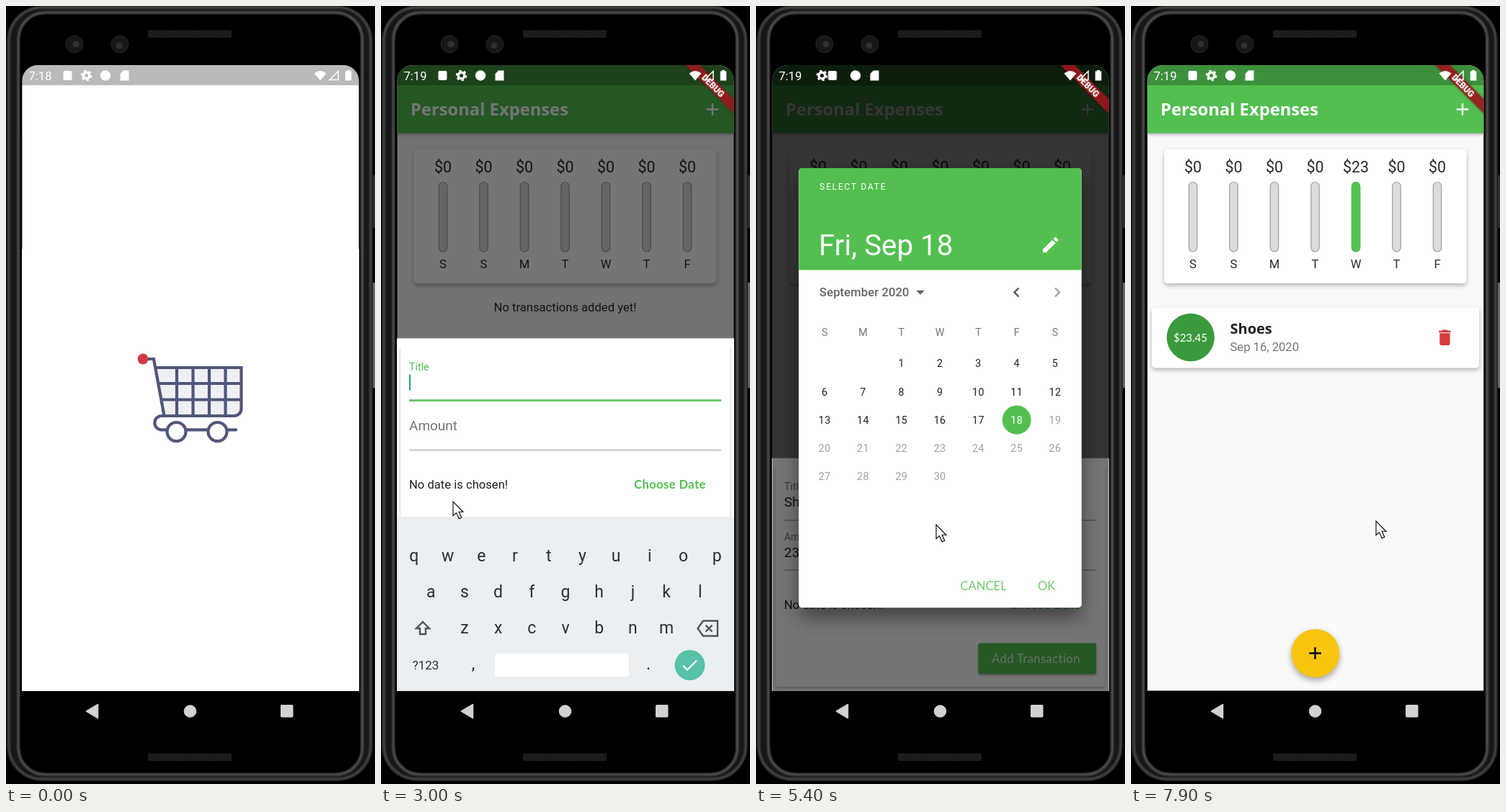
Write an HTML page that moves like this. It is 512x1080 px and loops after 8000 ms.

```html
<!DOCTYPE html>
<html lang="en">
<head>
<meta charset="utf-8">
<title>Personal Expenses</title>
<style>
html, body { margin: 0; width: 100%; height: 100%; overflow: hidden; background: #000; }
svg { display: block; width: 100vw; height: 100vh; font: 16.63px Roboto, sans-serif; }
.mid { text-anchor: middle; }
.geo { font-family: Lato, sans-serif; letter-spacing: .4px; }
.head { font-family: "Open Sans", sans-serif; font-weight: 700; }
.green { fill: #52bf50; }
.card { fill: #fff; filter: drop-shadow(0 3px 3px rgba(0,0,0,.28)); }
.line { stroke: #8c8c8c; stroke-width: 1.2; }
.focus { stroke: #52bf50; stroke-width: 2.4; }
.icon { fill: none; stroke: #4d565c; stroke-width: 2.4; }
.label { font-size: 14.25px; }
.entry { font-size: 19px; fill: #212121; }
.entry tspan { fill-opacity: 0; animation: typed 8s step-end infinite; }

.sheet { animation: sheet 8s infinite; }
.scrim { animation: scrim 8s infinite; }
.picker { animation: picker 8s infinite; }
.keyboard { animation: keyboard 8s infinite; }
.caret { animation: caret 8s step-end infinite; }
.cursor { animation: cursor 8s infinite ease-in-out; }
.title-label { animation: title-label 8s infinite; }
.amount-label { animation: amount-label 8s infinite; }
.title-focus { animation: title-focus 8s step-end infinite; }
.amount-focus { animation: amount-focus 8s step-end infinite; }
.notes { animation: notes 8s step-end infinite; }
.fresh { animation: fresh 8s step-end infinite; }
.slide-r { animation: slide-r 8s infinite; }
.slide-l { animation: slide-l 8s infinite; }

@keyframes typed { 0% { fill-opacity: 1 } 60%, 100% { fill-opacity: 0 } }
@keyframes sheet {
  0%, 24.4% { transform: translateY(324px); animation-timing-function: ease-out }
  28%, 35% { transform: none; animation-timing-function: ease-out }
  37.5%, 57.5% { transform: translateY(-166.5px); animation-timing-function: ease-in-out }
  60%, 89.5% { transform: none; animation-timing-function: ease-in }
  92%, 100% { transform: translateY(324px) }
}
@keyframes scrim { 0%, 24.4% { opacity: 0 } 28%, 89.5% { opacity: .54 } 92%, 100% { opacity: 0 } }
@keyframes picker { 0%, 64% { opacity: 0 } 66.5%, 85.2% { opacity: 1 } 87%, 100% { opacity: 0 } }
@keyframes keyboard {
  0%, 35% { transform: translateY(242px); animation-timing-function: ease-out }
  37.5%, 57.5% { transform: none; animation-timing-function: ease-in }
  60%, 100% { transform: translateY(242px) }
}
@keyframes caret {
  0% { opacity: 0; transform: none }
  36% { opacity: 1; transform: none }
  38.75% { opacity: 1; transform: translate(11.3px, 0) }
  40% { opacity: 1; transform: translate(21.8px, 0) }
  41.25% { opacity: 1; transform: translate(32.6px, 0) }
  42.5% { opacity: 1; transform: translate(42.7px, 0) }
  43.75% { opacity: 1; transform: translate(52.5px, 0) }
  45.625% { opacity: 1; transform: translate(0, 70px) }
  48.125% { opacity: 1; transform: translate(10.7px, 70px) }
  50% { opacity: 1; transform: translate(21.3px, 70px) }
  51.25% { opacity: 1; transform: translate(26.3px, 70px) }
  52.5% { opacity: 1; transform: translate(37px, 70px) }
  53.75% { opacity: 1; transform: translate(47.7px, 70px) }
  57.5%, 100% { opacity: 0; transform: none }
}
@keyframes cursor {
  0%, 12.45% { opacity: 0; transform: translate(330px, 720px) }
  12.5% { opacity: 1; transform: translate(330px, 720px) }
  17%, 24% { opacity: 1; transform: translate(233px, 907px) }
  30.5%, 57.5% { transform: translate(100px, 688px) }
  62%, 64% { transform: translate(400px, 826px) }
  67.4%, 68% { transform: translate(250px, 720px) }
  71%, 75% { transform: translate(253px, 577px) }
  80%, 82.5% { transform: translate(403px, 803px) }
  84.8%, 90% { transform: translate(384px, 899.5px) }
  96%, 100% { opacity: 1; transform: translate(340px, 715px) }
}
@keyframes title-label {
  0%, 35% { transform: translate(39px, 686px) scale(1.333); fill: #757575 }
  36.5%, 45.6% { transform: translate(39px, 672px); fill: #52bf50 }
  50%, 100% { transform: translate(39px, 672px); fill: #757575 }
}
@keyframes amount-label {
  0%, 45.6% { transform: translate(39px, 755px) scale(1.333); fill: #757575 }
  47.1%, 57.5% { transform: translate(39px, 741.5px); fill: #52bf50 }
  60%, 100% { transform: translate(39px, 741.5px); fill: #757575 }
}
@keyframes title-focus { 0% { opacity: 0 } 35% { opacity: 1 } 45.625%, 100% { opacity: 0 } }
@keyframes amount-focus { 0% { opacity: 0 } 45.625% { opacity: 1 } 57.5%, 100% { opacity: 0 } }
@keyframes notes { 0% { opacity: 1 } 12.5% { opacity: 0 } 25%, 100% { opacity: 1 } }
@keyframes fresh { 0% { opacity: 0 } 12.5% { opacity: 1 } 25%, 100% { opacity: 0 } }
@keyframes slide-r { 0%, 66.25% { transform: none } 67.3%, 68% { transform: translateX(20.5px) } 69%, 100% { transform: none } }
@keyframes slide-l { 0%, 66.25% { transform: none } 67.3%, 68% { transform: translateX(-20px) } 69%, 100% { transform: none } }
</style>
</head>
<body>
<svg viewBox="0 0 512 1080" preserveAspectRatio="none">
  <defs>
    <clipPath id="screen"><rect x="22.5" y="82" width="467" height="924" rx="22"/></clipPath>
    <clipPath id="view"><rect x="22.5" y="82" width="467" height="868.5"/></clipPath>
    <pattern id="mesh" width="3" height="3" patternUnits="userSpaceOnUse">
      <rect width="3" height="3" fill="#101010"/><path d="M0 3L3 0" stroke="#333"/>
    </pattern>
    <filter id="soft"><feGaussianBlur stdDeviation=".8"/></filter>
    <path id="zed" d="M0 0H56V9L18 72H56V82H0V73L38 10H0Z" fill="#404040"/>
    <path id="plus" d="M-8.3 0H8.3M0-8.3V8.3" stroke-width="2.4"/>
    <path id="pencil" d="M3 17.25V21h3.75L17.81 9.94l-3.75-3.75zM20.71 7.04c.39-.39.39-1.02 0-1.41l-2.34-2.34c-.39-.39-1.02-.39-1.41 0l-1.83 1.83 3.75 3.75z"/>
  </defs>

  <!-- phone body -->
  <rect width="512" height="1080"/>
  <path d="M510.500 235V308" stroke="#2c2c2c" stroke-width="3"/>
  <path d="M510.500 384V530" stroke="#666" stroke-width="3"/>
  <rect x="1" y="0" width="507.5" height="1076" rx="48" fill="#161616"/>
  <g fill="none" filter="url(#soft)">
    <rect x="4" y="2" width="502" height="1071" rx="46" stroke="#4a4a4a" stroke-width="3"/>
    <rect x="17" y="9" width="477.500" height="1058" rx="37" fill="#050505" stroke="#555" stroke-width="3"/>
  </g>
  <g fill="#171717" stroke="#252525"><circle cx="95" cy="53" r="12"/><circle cx="158" cy="53" r="12"/></g>
  <g fill="#2f2f2f"><circle cx="97" cy="53" r="4.5"/><circle cx="157" cy="55" r="4.5"/></g>
  <circle cx="337" cy="53" r="8.5"/>
  <rect x="197" y="33.5" width="116" height="10.5" rx="2" fill="url(#mesh)"/>
  <rect x="197" y="1037.5" width="116" height="10.5" rx="2" fill="url(#mesh)"/>

  <g clip-path="url(#screen)">
    <rect x="22" y="82" width="468" height="924"/>
    <g clip-path="url(#view)">
      <!-- home -->
      <rect x="22" y="82" width="468" height="869" fill="#fafafa"/>
      <rect x="22" y="82" width="468" height="94.5" class="green" style="filter:drop-shadow(0 2px 2px rgba(0,0,0,.3))"/>
      <rect x="22" y="82" width="468" height="28" fill-opacity=".25"/>
      <text x="41" y="152" class="head" font-size="23.76" fill="#fff">Personal Expenses</text>
      <use href="#plus" x="460" y="143.5" stroke="#fff"/>
      <rect x="46" y="199" width="419.5" height="186" rx="4.75" class="card"/>
      <g id="chart" class="mid" fill="#2a2a2a"></g>
      <g class="pre-list">
        <text x="255.5" y="424" class="mid" fill="#2a2a2a">No transactions added yet!</text>
        <use href="#zed" transform="translate(188 470) rotate(-8)"/>
        <use href="#zed" transform="translate(274 583) rotate(14.5)"/>
        <use href="#zed" transform="translate(183 708.5) rotate(-14.5)"/>
      </g>
      <g class="post-list">
        <rect x="29" y="418.5" width="454" height="84" rx="4.75" class="card"/>
        <circle cx="82.7" cy="460" r="33.2" fill="#3b9a3d"/>
        <text x="82.5" y="466" class="mid" font-family="Lato, sans-serif" font-size="15" fill="#fff">$23.45</text>
        <text x="137.5" y="455" class="head" font-size="20" fill="#212121">Shoes</text>
        <text x="137.5" y="479" fill="#757575">Sep 16, 2020</text>
        <path transform="translate(421.2 446) scale(1.188)" fill="#d83a3d" d="M6 19c0 1.1.9 2 2 2h8c1.1 0 2-.9 2-2V7H6zM19 4h-3.5l-1-1h-5l-1 1H5v2h14z"/>
      </g>
      <circle cx="255.8" cy="898.5" r="33.5" fill="#f8c50e" style="filter:drop-shadow(0 4px 4px rgba(0,0,0,.35))"/>
      <use href="#plus" x="255.5" y="898.5" stroke="#000"/>
      <rect x="22" y="82" width="468" height="869" class="scrim"/>

      <!-- entry form -->
      <g class="sheet">
        <rect x="22" y="627.7" width="468" height="500" fill="#fff"/>
        <rect x="27" y="633" width="457.5" height="312.5" rx="4.75" fill="#fff" style="filter:drop-shadow(0 1px 1.5px rgba(0,0,0,.35))"/>
        <rect x="25" y="628.5" width="461" height="12" fill="#fff"/>
        <path class="line" d="M39 714H472M39 783H472"/>
        <path class="focus title-focus" d="M39 714H472"/>
        <path class="focus amount-focus" d="M39 783.5H472"/>
        <text class="label title-label">Title</text>
        <text class="label amount-label">Amount</text>
        <text id="title" class="entry" x="39" y="694.5"></text>
        <text id="amount" class="entry" x="39" y="764.5"></text>
        <rect class="caret" x="39" y="678" width="2.2" height="22" fill="#3ba08f"/>
        <text class="pre-date" x="39" y="836.5" fill="#212121">No date is chosen!</text>
        <text class="post-date" x="39" y="836.5" fill="#212121">Wed, 9/16/2020</text>
        <text class="geo green" x="351" y="836.5" font-weight="700">Choose Date</text>
        <rect x="308.5" y="884.5" width="163.5" height="42.5" rx="2.5" class="green" style="filter:drop-shadow(0 2px 1.5px rgba(0,0,0,.35))"/>
        <text class="geo" x="327" y="912" fill="#e2f5e1">Add Transaction</text>
      </g>

      <!-- date picker -->
      <g class="picker">
        <rect x="22" y="82" width="468" height="869" fill-opacity=".54"/>
        <rect x="59.3" y="225" width="392.5" height="610.3" rx="4.75" fill="#fff" style="filter:drop-shadow(0 14px 14px rgba(0,0,0,.45))"/>
        <path class="green" d="M59.300 366.500V229.700a4.700 4.700 0 0 1 4.700-4.700H447.100a4.700 4.700 0 0 1 4.700 4.700V366.500Z"/>
        <g fill="#fff">
          <text x="88.3" y="255" font-size="11.9" letter-spacing="1.82">SELECT DATE</text>
          <g font-size="40.3">
            <text class="pre-pick" x="87" y="346">Fri, Sep 18</text>
            <text class="post-pick" x="87.5" y="346">Wed, Sep 16</text>
          </g>
          <use href="#pencil" transform="translate(394.5 317.3) scale(1.188)"/>
        </g>
        <text x="88" y="403.3" font-weight="500" letter-spacing=".1" fill="#666">September 2020</text>
        <path d="M222 394.7h12l-6 6z" fill="#666"/>
        <path class="icon" stroke="#555" d="M364.5 391.5l-6 6 6 6"/>
        <path class="icon" style="stroke:#a3a3a3" d="M415 391.5l6 6-6 6"/>
        <g id="days" class="mid" font-size="14.25"></g>
        <g class="green" font-family="Lato, sans-serif" fill-opacity=".82">
          <text x="283.5" y="811">CANCEL</text><text x="391" y="811">OK</text>
        </g>
      </g>

      <g transform="translate(489.5 82) rotate(45)">
        <rect x="-62" y="33.3" width="124" height="14.3" fill="#a0181e" fill-opacity=".87" style="filter:drop-shadow(0 0 2px rgba(0,0,0,.35))"/>
        <text class="mid" y="44.8" font-size="12.1" font-weight="900" fill="#fff">DEBUG</text>
      </g>

      <!-- splash -->
      <g class="pre-splash">
        <rect x="22" y="82" width="468" height="869" fill="#fff"/>
        <rect x="22" y="82" width="468" height="28" fill="#bababa"/>
        <g fill="none" stroke="#50567a" stroke-width="4.2">
          <path fill="#eef0f4" d="M208 502H326.5V559a10 10 0 0 1-10 10H219.5"/>
          <path d="M190 490H205L219.5 569H216a9.7 9.7 0 0 0 0 19.4H319" stroke-linecap="round"/>
          <path d="M211 524H326M215 546.5H326M237 502V569M259.5 502V569M282 502V569M304.5 502V569"/>
          <g fill="#fff"><circle cx="236.5" cy="591" r="13"/><circle cx="293.5" cy="591" r="13"/></g>
        </g>
        <circle cx="190" cy="490" r="7.4" fill="#d23742"/>
      </g>

      <!-- keyboard -->
      <g class="keyboard mid" fill="#263037">
        <rect x="22" y="709" width="468" height="242" fill="#eceff2"/>
        <g id="letters" class="pre-keys" font-size="23"></g>
        <g id="digits" class="post-keys" font-size="36"></g>
        <circle cx="428.5" cy="915" r="21" fill="#57c1a9"/>
        <path class="icon" style="stroke:#fff" d="M419 915.5l6 6 13-13"/>
      </g>
    </g>

    <!-- status bar -->
    <g fill="#fff">
      <text class="pre-clock" x="31.5" y="102.5">7:18</text>
      <text class="post-clock" x="31.5" y="102.5">7:19</text>
      <rect class="slide-r" x="79.5" y="90" width="12" height="13" rx="2"/>
      <g class="slide-l" fill="none" stroke="#fff">
        <circle cx="111.5" cy="96.5" r="4.3" stroke-width="3.4"/>
        <circle cx="111.5" cy="96.5" r="6.6" stroke-width="2.4" stroke-dasharray="3.2 3.71"/>
      </g>
      <g class="notes">
        <circle cx="138" cy="96.5" r="7.2"/>
        <path d="M163 89.5h7.5v14h-12v-9.5z"/>
      </g>
      <g class="fresh">
        <circle cx="138" cy="96.5" r="6"/><circle cx="164.5" cy="96.5" r="7.2"/><circle cx="190.5" cy="97" r="2.3"/>
      </g>
      <path d="M427.5 93.5Q436 86.5 444.5 93.5L436 103.5Z"/>
      <path d="M461 90.5V102.5H449Z" fill="none" stroke="#fff" stroke-width="1.5"/>
      <path d="M473 89h4v1.5h2.3V103.5h-8.6V90.5H473z"/>
    </g>
    <g fill="#d2d2d2" stroke="#d2d2d2" stroke-linejoin="round">
      <path d="M111.5 979L127.5 969.5V988.5Z" stroke-width="1.5"/>
      <circle cx="255.5" cy="979" r="8.3"/>
      <rect x="381.5" y="970.5" width="16.5" height="16.5" rx="1"/>
    </g>
  </g>
  <path class="cursor" d="M0 0V19.5L4.5 15.6L8.2 23.8L11.8 22.2L8.2 14.3H14Z" fill="#fff" stroke="#000" stroke-width="1.1"/>
</svg>
<script>
const LOOP = 8000;
const fill = (id, html) => { document.getElementById(id).innerHTML = html; };
const text = (x, y, s, attrs = '') => `<text x="${x}" y="${y}" ${attrs}>${s}</text>`;

// Hard cuts: pre-* shows before the given time, post-* after it.
const cuts = { splash: 300, clock: 2000, keys: 3650, pick: 5800, date: 6600, list: 7150 };
const css = Object.entries(cuts).map(([name, ms]) => {
  const rule = (cls, a, b) => `.${cls}{animation:${cls} ${LOOP}ms step-end infinite}
    @keyframes ${cls}{0%{opacity:${a}}${ms / LOOP * 100}%,100%{opacity:${b}}}`;
  return rule('pre-' + name, 1, 0) + rule('post-' + name, 0, 1);
}).join('');
document.head.append(Object.assign(document.createElement('style'), { textContent: css }));

const typed = (word, times) => [...word]
  .map((c, i) => `<tspan style="animation-delay:${times[i]}ms">${c}</tspan>`).join('');
fill('title', typed('Shoes', [3100, 3200, 3300, 3400, 3500]));
fill('amount', typed('23.45', [3850, 4000, 4100, 4200, 4300]));

const sum = (x, s, cls = '') => text(x, 231, s, `font-size="21.4" class="${cls}"`);
fill('chart', [...'SSMTWTF'].map((day, i) => {
  const x = 86 + 56.5 * i, spent = i === 4;
  return (spent ? sum(x, '$0', 'pre-list') + sum(x, '$23', 'post-list') : sum(x, '$0')) +
    `<rect x="${x - 5.7}" y="244.5" width="11.4" height="96.5" rx="5.7" fill="#dcdcdc" stroke="#9e9e9e" stroke-width="1.2"/>` +
    (spent ? `<rect x="${x - 6.2}" y="244" width="12.4" height="97.5" rx="6" class="green post-list"/>` : '') +
    text(x, 364, day);
}).join(''));

const GREEN = '#52bf50', INK = '#212121';
const colX = i => 95.2 + 53.3 * (i % 7);
const day = (d, ink, disc = '', cls = '') => {
  const x = colX(d + 1), y = 496 + 39.3 * Math.floor((d + 1) / 7);
  return `<g class="${cls}">${disc && `<circle cx="${x}" cy="${y}" ${disc}/>`}${text(x, y + 5.2, d, `fill="${ink}" letter-spacing=".4"`)}</g>`;
};
const full = `r="20" fill="${GREEN}"`, ring = `r="19.3" fill="none" stroke="${GREEN}" stroke-width="1.2"`;
let month = [...'SMTWTFS'].map((s, i) => text(colX(i), 457.5, s, 'fill="#777"')).join('');
for (let d = 1; d <= 30; d++) {
  if (d === 16) month += day(d, INK, '', 'pre-pick') + day(d, '#fff', full, 'post-pick');
  else if (d === 18) month += day(d, '#fff', full, 'pre-pick') + day(d, GREEN, ring, 'post-pick');
  else month += day(d, d > 18 ? '#a0a0a0' : INK);
}
fill('days', month);

const erase = y => `<path class="icon" d="M422 ${y - 10.5}H442V${y + 10.5}H422L414.5 ${y}ZM425.5 ${y - 4.5}l9 9m0-9l-9 9"/>`;
fill('digits', ['123', '456', '789', ',0.'].map((row, r) =>
  [...row].map((c, i) => text(82 + 115.5 * i, 759 + 58.7 * r, c)).join('')).join('') +
  '<path class="icon" d="M421.5 747H436M415.5 801V807H441.5V801"/>' + erase(863.5));

fill('letters', ['qwertyuiop', 'asdfghjkl', 'zxcvbnm'].map((row, r) =>
  [...row].map((c, i) => text(256 + 46.7 * (i - (row.length - 1) / 2), 771 + 50 * r, c)).join('')).join('') +
  '<path class="icon" d="M58 855l9 9h-5v8h-8v-8h-5z"/>' +
  `<g transform="translate(25 0)">${erase(864)}</g>` +
  '<rect x="158" y="899" width="186" height="32" rx="4" fill="#fff"/>' +
  text(62, 921, '?123', 'font-size="17"') + text(128, 921, ',') + text(371, 921, '.'));
</script>
</body>
</html>
```
